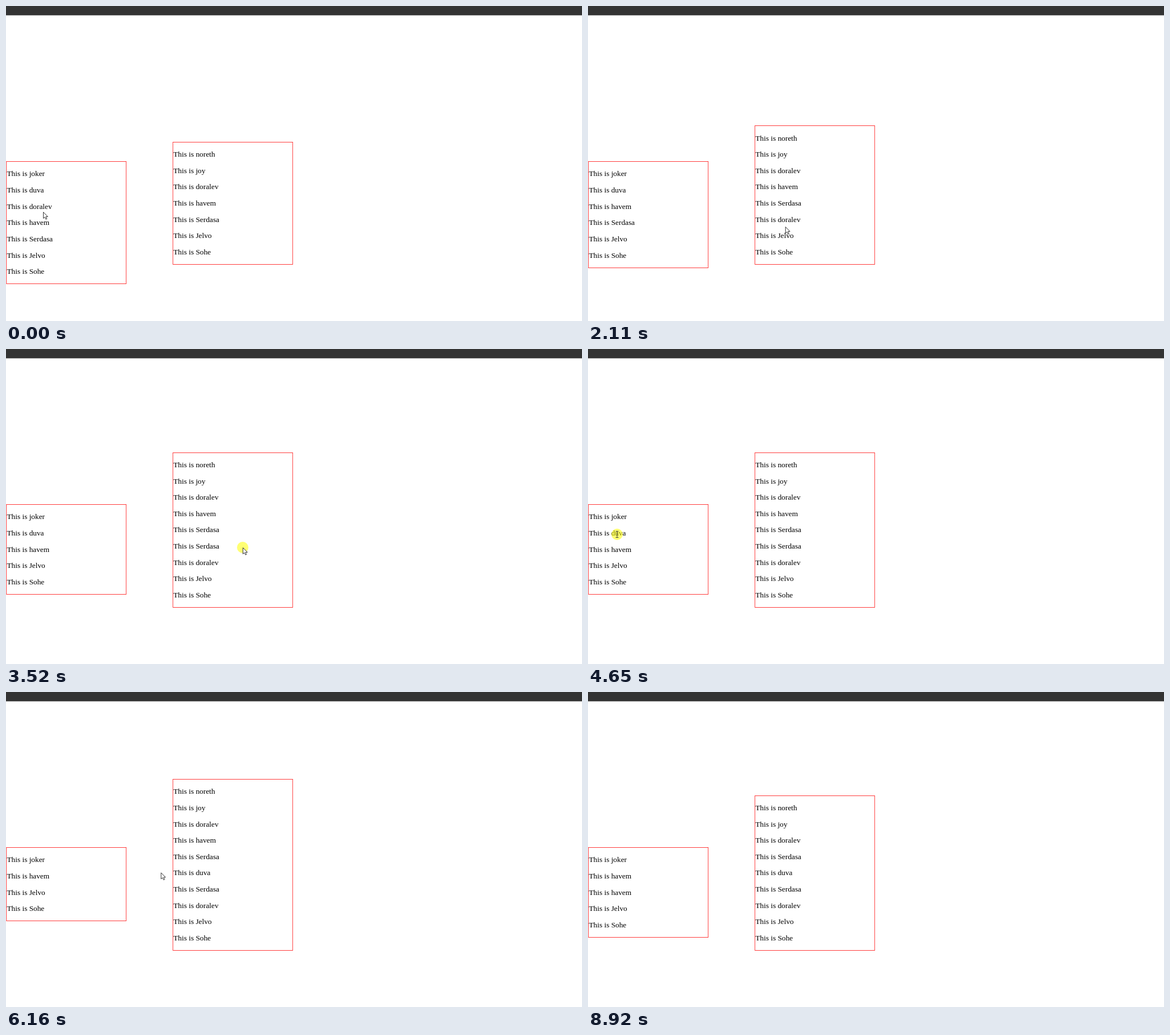
An HTML page with a canvas that plays this animation: 1010x554 px, repeating every 9400 ms.

```html
<!DOCTYPE html>
<html lang="en">
<head>
<meta charset="utf-8">
<title>Sortable lists</title>
<style>
html, body { margin: 0; width: 100%; height: 100%; overflow: hidden; background: #fff; }
canvas { display: block; }
</style>
</head>
<body>
<canvas id="stage" width="1010" height="554"></canvas>
<script>
const ctx = document.getElementById('stage').getContext('2d');
const LOOP = 9400, ROW = 28.65, PAD = 14.6, BOX_W = 210;
const LEFT_X = 0.3, LEFT_TOP = 273, RIGHT_X = 292.3, RIGHT_BOTTOM = 454;
const ARROW = 0, BEAM = 1;

const common = ['doralev', 'havem', 'Serdasa', 'Jelvo', 'Sohe'];
const lists = [['joker', 'duva', ...common], ['noreth', 'joy', ...common]];

// from/to: [list, index]; cross: when the gap changes list
const drags = [
  { from: [0, 2], to: [1, 5], start: 1230, cross: 1450, drop: 1780, lag: 62 },
  { from: [0, 3], to: [1, 5], start: 2980, cross: 3260, drop: 3520, lag: 62 },
  { from: [0, 1], to: [1, 5], start: 4660, cross: 5090, drop: 5190, lag: 40 },
  { from: [1, 3], to: [0, 2], start: 7120, cross: 7280, drop: 7350, lag: 7 }
];

// [time, x, y, cursor]
const path = [
  [0, 65, 362, ARROW], [69.9, 65, 362, ARROW], [70, 59, 362, ARROW],
  [600, 59, 362, ARROW], [680, 53, 361, BEAM], [880, 46, 360, BEAM],
  [1220, 46, 360, BEAM], [1420, 225, 370, ARROW], [1700, 443, 388, ARROW],
  [2109.9, 443, 388, ARROW], [2110, 346.5, 388, ARROW], [2400, 150, 388, ARROW],
  [2680, 68, 388, BEAM], [2970, 68, 388, BEAM], [2990, 79, 387, ARROW],
  [3180, 279, 348.7, ARROW], [3430, 415, 349, ARROW], [3840, 415, 349, ARROW],
  [3980, 180, 336, ARROW], [4120, 51, 326, BEAM], [4660, 51, 326, BEAM],
  [4880, 125, 322, BEAM], [5130, 209, 319, ARROW], [6159.9, 209, 319, ARROW],
  [6160, 271.3, 317.5, ARROW], [6420, 308, 285, ARROW], [6660, 336, 261, BEAM],
  [7120, 336, 261, BEAM], [7220, 145, 330, BEAM], [7300, 148, 340, BEAM],
  [7879.9, 148, 340, BEAM], [7880, 492, 439, ARROW], [7949.9, 492, 439, ARROW],
  [7950, 970, 600, ARROW], [8709.9, 970, 600, ARROW], [8710, 973, 551, ARROW],
  [8850, 964, 551, ARROW], [8919.9, 964, 551, ARROW], [8920, 970, 600, ARROW],
  [LOOP, 970, 600, ARROW]
];

const presses = [[890, 2110], [2710, 3850], [4650, 6160], [6920, 7880]];

function cursorAt(t) {
  const i = path.findIndex(k => k[0] > t);
  const a = path[i - 1], b = path[i];
  const p = (t - a[0]) / (b[0] - a[0]);
  return { x: a[1] + (b[1] - a[1]) * p, y: a[2] + (b[2] - a[2]) * p, kind: p > 0.8 ? b[3] : a[3] };
}

const boxX = n => n ? RIGHT_X : LEFT_X;
const boxTop = (n, rows) => n ? RIGHT_BOTTOM - PAD - rows * ROW : LEFT_TOP;
const rowPos = (n, i, rows) => [boxX(n) + 1.2, boxTop(n, rows) + 26.3 + i * ROW];

function label(name, x, y) {
  ctx.fillText('This is ' + name, x, y);
}

function drawList(n, names) {
  const top = boxTop(n, names.length);
  const y = Math.round(top);
  const bottom = Math.round(top + PAD + names.length * ROW);
  ctx.strokeRect(boxX(n) + 0.45, y + 0.5, BOX_W, bottom - y);
  names.forEach((name, i) => name && label(name, ...rowPos(n, i, names.length)));
}

function drawArrow(x, y) {
  ctx.beginPath();
  [[0, 0], [0, 11], [2.6, 8.7], [4.4, 12.6], [6.2, 11.8], [4.5, 8], [7.8, 8]]
    .forEach(([dx, dy]) => ctx.lineTo(x + 0.5 + dx, y + 0.5 + dy));
  ctx.closePath();
  ctx.fillStyle = '#fff';
  ctx.fill();
  ctx.strokeStyle = '#222';
  ctx.lineWidth = 0.9;
  ctx.stroke();
}

function drawBeam(x, y) {
  ctx.beginPath();
  ctx.moveTo(x - 2.5, y - 5.5);
  ctx.lineTo(x + 2.5, y - 5.5);
  ctx.moveTo(x, y - 5.5);
  ctx.lineTo(x, y + 5.5);
  ctx.moveTo(x - 2.5, y + 5.5);
  ctx.lineTo(x + 2.5, y + 5.5);
  ctx.strokeStyle = '#333';
  ctx.lineWidth = 0.9;
  ctx.stroke();
}

function draw(t) {
  ctx.fillStyle = '#fff';
  ctx.fillRect(0, 0, 1010, 554);
  ctx.fillStyle = '#333';
  ctx.fillRect(0, 0, 1010, 16.4);

  const now = lists.map(l => [...l]);
  let held = null;
  for (const d of drags) {
    if (t < d.start) break;
    const [src, i] = d.from, [dst, j] = d.to;
    const name = now[src][i];
    const active = t < d.drop;
    if (active) {
      const grab = cursorAt(d.start), at = cursorAt(Math.max(d.start, t - d.lag));
      const [x, y] = rowPos(src, i, now[src].length);
      held = [name, x + at.x - grab.x, y + at.y - grab.y];
    }
    if (t >= d.cross) {
      now[src].splice(i, 1);
      now[dst].splice(j, 0, active ? '' : name);
    } else {
      now[src][i] = '';
    }
  }

  ctx.fillStyle = '#000';
  ctx.strokeStyle = '#ff1c1c';
  ctx.lineWidth = 0.85;
  ctx.font = '13.3px "Liberation Serif", "Times New Roman", serif';
  now.forEach((names, n) => drawList(n, names));
  if (held) label(...held);

  const c = cursorAt(t);
  if (presses.some(([a, b]) => t >= a && t < b)) {
    ctx.fillStyle = 'rgba(255, 255, 0, 0.55)';
    ctx.beginPath();
    ctx.arc(c.x, c.y, 10, 0, Math.PI * 2);
    ctx.fill();
  }
  (c.kind === BEAM ? drawBeam : drawArrow)(c.x, c.y);
}

const begin = performance.now();
function tick() {
  draw((performance.now() - begin) % LOOP);
  requestAnimationFrame(tick);
}
tick();
</script>
</body>
</html>
```
